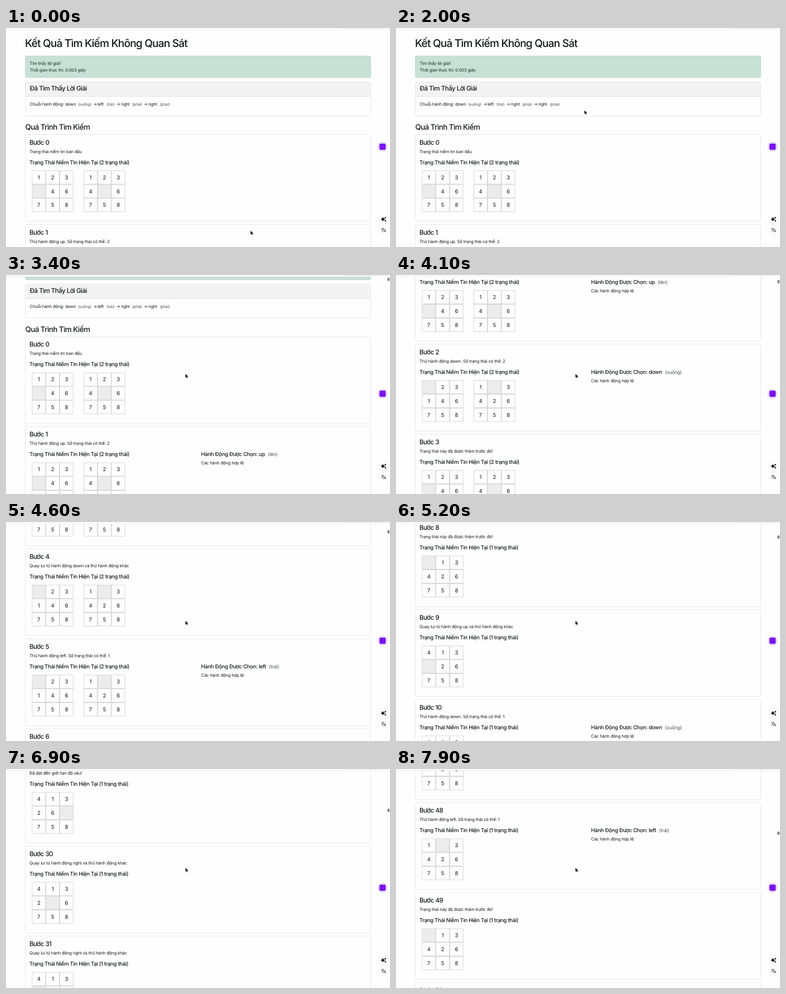
Animation, 688 px wide and 392 px high, one loop 8000 ms. Source, as an HTML page:

```html
<!DOCTYPE html>
<html lang="vi">
<head>
<meta charset="utf-8">
<title>Kết Quả Tìm Kiếm</title>
<style>
  html, body { margin: 0; width: 100%; height: 100%; overflow: hidden; background: #fefefe; }
  svg { display: block; width: 688px; height: 392px; }
  text { font-family: Inter, "Open Sans", sans-serif; fill: #15181b; text-rendering: geometricPrecision; white-space: pre; }
  .h1, .h3, .h4, .h5 { font-weight: 500; letter-spacing: -.042em; }
  .h1 { font-size: 19.1px; }
  .h3 { font-size: 13.4px; }
  .h4 { font-size: 11.5px; letter-spacing: -.045em; }
  .h5 { font-size: 9.56px; letter-spacing: -.033em; }
  .p { font-size: 7.65px; letter-spacing: -.021em; }
  .small { font-size: 6.7px; letter-spacing: -.015em; fill: #45494d; }
  .hint { font-size: 8.37px; font-weight: 400; letter-spacing: -.01em; fill: #45494d; }
  .ok { fill: #0a3622; }
  .num { font-size: 9.56px; text-anchor: middle; }
  .card { fill: #fefefe; stroke: #e2e2e2; stroke-width: .8; }
  .cell { fill: #fefefe; stroke: #d3d3d3; stroke-width: .9; }
  .blank { fill: #ececec; }
</style>
</head>
<body>
<svg viewBox="0 0 688 392">
  <g id="page"></g>

  <g id="chrome">
    <rect width="688" height="3" fill="#fcfcfd"/>
    <rect y="2.3" width="688" height=".9" fill="#ececef"/>
    <rect x="603" y="-3" width="77" height="4" rx="2" fill="#ebe6f7"/>
  </g>
  <rect id="thumb" x="683.4" width="3.8" height="6.4" rx="1.9" fill="#858585"/>

  <circle cx="674.6" cy="212.5" r="8.8" fill="#e0d4f4"/>
  <rect x="669.2" y="207" width="11" height="11" rx="2" fill="#7a14ee"/>

  <g fill="#fff" stroke="#f3f3f3" stroke-width="1">
    <circle cx="676.6" cy="342" r="9"/>
    <circle cx="676.6" cy="361.5" r="9"/>
  </g>
  <g fill="#111">
    <path d="M675.3 337.8q.8 3.6 4.4 4.4q-3.6 .8-4.4 4.4q-.8-3.6-4.4-4.4q3.6-.8 4.4-4.4z"/>
    <path d="M679.6 337.4q.4 1.6 2 2q-1.6 .4-2 2q-.4-1.6-2-2q1.6-.4 2-2z"/>
    <path d="M679.6 343q.4 1.6 2 2q-1.6 .4-2 2q-.4-1.6-2-2q1.6-.4 2-2z"/>
  </g>
  <path d="M672.3 359h5.4M675 357.8v1.2M676.7 359q-.8 3-4.2 4.8M673.4 359.9q1 2 3 3.2M676.6 365.6l2.1-5.2l2.1 5.2M677.3 364h2.8"
        fill="none" stroke="#333" stroke-width=".8"/>

  <path id="cursor" d="M0 0V6.6L1.6 5.2L2.6 7.6L3.8 7.1L2.8 4.8H4.9Z" fill="#000" stroke="#fff" stroke-width=".6" paint-order="stroke"/>
</svg>

<script>
const LOOP = 8000, TICK = 100;
const PITCH = 161, STEPS = 52, MAX_DEPTH = 5;
const ACTIONS = { up: 'lên', down: 'xuống', left: 'trái', right: 'phải' };
const $ = id => document.getElementById(id);

// Belief-state search that yields the listed steps; 0 is the blank tile.
function move(state, action) {
  const b = state.indexOf('0');
  const to = {
    up: b > 2 && b - 3,
    down: b < 6 && b + 3,
    left: b % 3 > 0 && b - 1,
    right: b % 3 < 2 && b + 1
  }[action];
  if (to === false) return null;
  const tiles = [...state];
  [tiles[b], tiles[to]] = [tiles[to], tiles[b]];
  return tiles.join('');
}

function searchSteps(start) {
  const steps = [], seen = new Set();
  const add = (belief, note, action) => steps.push({ belief, note, action });
  function visit(belief, depth) {
    if (depth >= MAX_DEPTH) return add(belief, 'Đã đạt đến giới hạn độ sâu!');
    const key = [...belief].sort().join();
    if (seen.has(key)) return add(belief, 'Trạng thái này đã được thăm trước đó!');
    seen.add(key);
    for (const action in ACTIONS) {
      const next = [...new Set(belief.map(s => move(s, action)).filter(Boolean))];
      if (!next.length) continue;
      add(belief, `Thử hành động ${action}. Số trạng thái có thể: ${next.length}`, action);
      visit(next, depth + 1);
      add(belief, `Quay lui từ hành động ${action} và thử hành động khác`);
    }
  }
  add(start, 'Trạng thái niềm tin ban đầu');
  visit(start, 0);
  return steps.slice(0, STEPS);
}

const text = (x, y, cls, str) => `<text x="${x}" y="${y}" class="${cls}">${str}</text>`;
const box = (x, y, w, h, cls, rx = 0, more = '') =>
  `<rect x="${x}" y="${y}" width="${w}" height="${h}" rx="${rx}" class="${cls}" ${more}/>`;

function grid(state, left) {
  return [...state].map((n, i) => {
    const x = left + i % 3 * 24.8, y = 255.4 + Math.floor(i / 3) * 24.8;
    return n === '0'
      ? box(x, y, 23.8, 23.8, 'cell blank')
      : box(x, y, 23.8, 23.8, 'cell') + text(x + 11.9, y + 15.4, 'num', n);
  }).join('');
}

function stepCard({ belief, note, action }, i) {
  const chosen = action
    ? text(349.5, 243.5, 'h5', `Hành Động Được Chọn: ${action}<tspan class="hint" dx="5.3">(${ACTIONS[action]})</tspan>`)
      + text(349.5, 258.2, 'p', 'Các hành động hợp lệ:')
    : '';
  return `<g transform="translate(0 ${i * PITCH})">`
    + box(34.5, 190.5, 619, 155.6, 'card', 2.5)
    + text(42, 208.7, 'h4', `Bước ${i}`)
    + text(42, 223.8, 'p', note)
    + text(42, 243.5, 'h5', `Trạng Thái Niềm Tin Hiện Tại (${belief.length} trạng thái)`)
    + belief.map((s, k) => grid(s, 46.9 + k * 92.7)).join('')
    + chosen + '</g>';
}

const plan = [['down', 106, 129, 156], ['left', 164, 180, 197.5], ['right', 206, 226, 246.5], ['right', 255, 275.7]];
const planText = plan.map(([a, x, hintX, arrowX]) =>
  text(x, 139, 'p', a) + text(hintX, 139, 'small', `(${ACTIONS[a]})`) + (arrowX ? text(arrowX, 139, 'p', '→') : '')
).join('');

$('page').innerHTML =
  text(34, 34, 'h1', 'Kết Quả Tìm Kiếm Không Quan Sát')
  + box(34.5, 50, 619, 38.8, '', 2.5, 'fill="#c8e0d6" stroke="#b9d8ca" stroke-width=".8"')
  + text(42.6, 66.4, 'p ok', 'Tìm thấy lời giải!')
  + text(42.6, 78, 'p ok', 'Thời gian thực thi: 0.003 giây')
  + box(34.5, 96.5, 619, 61, 'card', 2.5)
  + box(34.9, 96.9, 618.2, 25.6, '', 2, 'fill="#f3f3f3"')
  + box(34.5, 122.2, 619, .8, '', 0, 'fill="#e0e0e0"')
  + text(42.6, 112.2, 'h4', 'Đã Tìm Thấy Lời Giải')
  + text(42.6, 139, 'p', 'Chuỗi hành động:') + planText
  + text(34.5, 182.2, 'h3', 'Quá Trình Tìm Kiếm')
  + searchSteps(['123046758', '123406758']).map(stepCard).join('');

// Seconds, scroll offset, speed.
const scrollKeys = [
  [2.4, 0, 0], [2.8, 40, 0], [2.9, 40, 15], [3.4, 80.3, 224], [4.1, 388.6, 656],
  [5.2, 1482.6, 1390], [6.9, 4882.5, 2614], [7.9, 7858.5, 3337]
];
// Seconds, x, y of the pointer tip.
const pointerKeys = [
  [0, 438.3, 363], [.1, 300, 240], [.2, 91, 142], [.3, 210, 144], [.4, 340.2, 148],
  [1.9, 340.2, 148], [2, 337.6, 147.4], [2.1, 328, 163], [2.2, 321.6, 177.1]
];

function segment(keys, t) {
  const i = keys.findIndex(k => k[0] > t);
  if (i < 0) return [keys.at(-1), keys.at(-1), 0, 0];
  if (i === 0) return [keys[0], keys[0], 0, 0];
  const a = keys[i - 1], b = keys[i], span = b[0] - a[0];
  return [a, b, (t - a[0]) / span, span];
}

function scrollAt(t) {
  const [a, b, u, span] = segment(scrollKeys, t);
  const w = u * u * (3 - 2 * u);
  return a[1] + (b[1] - a[1]) * w
    + span * u * (1 - u) * (a[2] * (1 - u) - b[2] * u);
}

function draw(ms) {
  const t = Math.floor(ms % LOOP / TICK) * TICK / 1000;
  const y = scrollAt(t);
  $('page').setAttribute('transform', `translate(0 ${-y.toFixed(2)})`);
  $('thumb').setAttribute('y', 3.4 + y * .0138);
  $('thumb').style.display = y > 0 ? '' : 'none';
  const [a, b, u] = segment(pointerKeys, t);
  const mix = k => a[k] + (b[k] - a[k]) * u;
  $('cursor').setAttribute('transform', `translate(${mix(1)} ${mix(2)})`);
}

let began;
function loop(now) {
  began ??= now;
  draw(now - began);
  requestAnimationFrame(loop);
}
draw(0);
requestAnimationFrame(loop);
</script>
</body>
</html>
```
